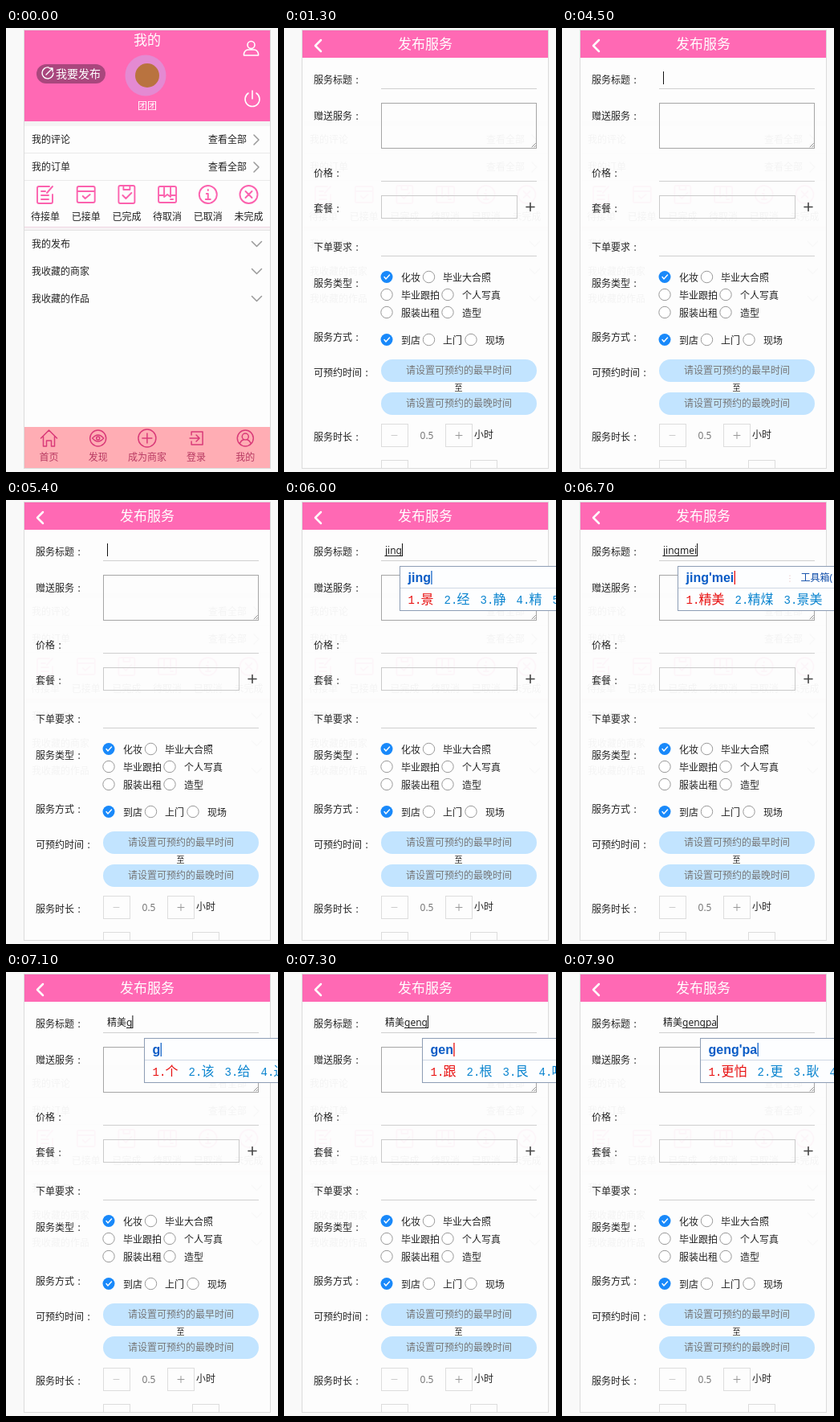
An HTML page that plays this animation: 339x552 px, repeating every 8 s.

```html
<!DOCTYPE html>
<html lang="zh-CN">
<head>
<meta charset="utf-8">
<title>发布服务</title>
<style>
html, body { margin: 0; width: 100%; height: 100%; overflow: hidden; background: #f9f9f9; }
svg { display: block; width: 339px; height: 552px; }
text { font: 12px "Noto Sans", "Noto Sans CJK SC", "Noto Sans CJK", sans-serif; fill: #222; white-space: pre; }
.title { font-size: 17px; fill: #fff; }
.mid { text-anchor: middle; }
.line { fill: none; stroke-linecap: round; stroke-linejoin: round; }
#popup .typed { font: bold 16px "Liberation Sans", Arial, sans-serif; fill: #0a5cc6; }
#popup .num { font: 14px "Liberation Mono", monospace; }
#popup .cand { font-size: 16px; }
</style>
</head>
<body>
<svg viewBox="0 0 339 552" xmlns="http://www.w3.org/2000/svg">
  <defs><clipPath id="screen"><rect x="23" y="3" width="306" height="544"/></clipPath></defs>
  <rect x="22.5" y="2.5" width="307" height="545" fill="#fdfdfd" stroke="#dcdcdc"/>
  <g clip-path="url(#screen)">
    <g id="list"></g>
    <g id="profile"></g>
    <g id="form"></g>
  </g>
  <g id="field">
    <text id="entry" x="126" y="67"></text>
    <path id="under" stroke="#222"/>
    <path id="caret" stroke="#111"/>
  </g>
  <g id="popup"></g>
</svg>
<script>
const $ = id => document.getElementById(id);
const PINK = '#ff69b4', ICON = '#fb62ae', TAB = '#d93a78';

const text = (x, y, s, attrs = '') => `<text x="${x}" y="${y}" ${attrs}>${s}</text>`;
const mid = (x, y, s, style = '') => text(x, y, s, `class="mid" style="${style}"`);
const rect = (x, y, w, h, fill, more = '') =>
  `<rect x="${x}" y="${y}" width="${w}" height="${h}" fill="${fill}" ${more}/>`;
const path = (d, color, width = 1, at = '0 0') =>
  `<path class="line" d="${d}" stroke="${color}" stroke-width="${width}" transform="translate(${at})"/>`;
const ring = (x, y, r) => `M${x - r} ${y}a${r} ${r} 0 1 0 ${2 * r} 0a${r} ${r} 0 1 0 ${-2 * r} 0`;
const box = (x, y, w, h, color) => rect(x + .5, y + .5, w, h, 'none', `stroke="${color}"`);
const rule = (x1, x2, y, color) => `<path d="M${x1} ${y + .5}H${x2}" stroke="${color}"/>`;

// Profile page: rows and order states
const orders = [
  ['待接单', 'M5 -10H-8Q-10 -10 -10 -8V9Q-10 11 -8 11H7Q9 11 9 9V0M9 -10L2 -2M-5 -4H0M-5 1H4M-5 6H4'],
  ['已接单', 'M-9 -10H9Q11 -10 11 -8V8Q11 10 9 10H-9Q-11 10 -11 8V-8Q-11 -10 -9 -10M-11 -4H11M-4 2L-1 5L5 0'],
  ['已完成', 'M-8 -11H8Q10 -11 10 -9V9Q10 11 8 11H-8Q-10 11 -10 9V-9Q-10 -11 -8 -11M-4 -11V-6H4V-11M-5 1L-1 5L6 -2'],
  ['待取消', 'M-9 -10H9Q11 -10 11 -8V8Q11 10 9 10H-9Q-11 10 -11 8V-8Q-11 -10 -9 -10M-11 1H-4M4 1H11M-4 -10V3L0 0L4 3V-10M4 6H7'],
  ['已取消', ring(0, 0, 11) + 'M0 -6V-5M-2 -1H0V6M-3 6H3'],
  ['未完成', ring(0, 0, 11) + 'M-4 -4L4 4M4 -4L-4 4']
];

$('list').innerHTML =
  rect(23, 116, 306, 6, '#f4f4f4') +
  [['我的评论', 139], ['我的订单', 173]].map(([s, y]) =>
    text(32, y + 4, s) + text(252, y + 4, '查看全部') +
    path('M0 -6L6 0L0 6', '#999', 1.5, `309 ${y}`) + rule(23, 329, y + 16, '#eaeaea')).join('') +
  orders.map(([s, d], i) => {
    const x = 49 + i * 50.7;
    return path(d, ICON, 1.9, `${x} 207`) + mid(x, 239, s);
  }).join('') +
  rect(23, 247, 306, 5, '#f6f2f4') + rule(23, 329, 247, '#f0d5e2') + rule(23, 329, 251, '#e4e4e4') +
  ['我的发布', '我收藏的商家', '我收藏的作品'].map((s, i) =>
    text(32, 273 + i * 34, s) + path('M-6 -3L0 3L6 -3', '#999', 1.5, `312.5 ${268.5 + i * 34}`)).join('');

const tabs = [
  ['首页', 'M-10 0L0 -10L10 0M-7 -2V10H-3V3H3V10H7V-2'],
  ['发现', ring(0, 0, 10) + 'M-7 0Q0 -8 7 0Q0 8 -7 0' + ring(0, 0, 2)],
  ['成为商家', ring(0, 0, 11) + 'M-6 0H6M0 -6V6'],
  ['登录', 'M-6 -4V-8H8V8H-6V4M-8 0H3M0 -4L4 0L0 4'],
  ['我的', ring(0, 0, 10) + ring(0, -2, 4) + 'M-7 7Q-5 2 -2 2M7 7Q5 2 2 2']
];

$('profile').innerHTML =
  rect(23, 3, 306, 113, PINK) + text(176, 21, '我的', 'class="title mid"') +
  path(ring(0, -5, 4.5) + 'M-9 8V6Q-8 1 -3 1H3Q8 1 9 6V8Z', '#fff', 1.6, '305.5 26') +
  path('M-5 -7A9 9 0 1 0 5 -7M0 -10V0', '#fff', 1.6, '307 88') +
  rect(38, 45, 86, 24, '#a9477d', 'rx="12"') +
  path('M1 -7A7 7 0 1 0 7 0M-2 2L6 -6M2 -6H6V-2', '#fff', 1.4, '52 56') +
  text(62, 62, '我要发布', 'style="font-size:14px;fill:#fff"') +
  '<circle cx="174" cy="59" r="25.5" fill="#e48ad2"/><circle cx="176" cy="59" r="15" fill="#b9733f"/>' +
  mid(176, 101, '团团', 'fill:#fff') +
  rect(23, 496, 306, 51, '#ffadb4') +
  tabs.map(([s, d], i) => {
    const x = 53.5 + i * 61.2;
    return path(d, TAB, 1.5, `${x} 510`) + mid(x, 538, s, 'fill:#b83a62');
  }).join('');

// Publishing form
const label = (y, s) => text(37, y, s) + mid(43 + 12 * s.length, y, ':');
const radio = (x, y, s, tx, on) => (on
  ? `<circle cx="${x}" cy="${y}" r="7.5" fill="#1989fa"/>` + path('M-3 0L-1 2.5L3.5 -2.5', '#fff', 1.4, `${x} ${y}`)
  : `<circle cx="${x}" cy="${y}" r="7.2" fill="#fff" stroke="#999"/>`) + text(tx, y + 5, s);
const pill = (y, s) => rect(121, y, 194, 28, '#c2e4ff', 'rx="14"') + mid(218, y + 18, s, 'fill:#767676');

$('form').innerHTML =
  rect(23, 3, 306, 34, PINK) + path('M46 15L39 22L46 29', '#fff', 2.5) +
  text(176, 26, '发布服务', 'class="title mid"') +
  [[69, '服务标题'], [114, '赠送服务'], [185, '价格'], [229, '套餐'], [277, '下单要求'],
   [322, '服务类型'], [389, '服务方式'], [433, '可预约时间'], [513, '服务时长']].map(a => label(...a)).join('') +
  [75, 190, 283].map(y => rule(121, 315, y, '#d0d0d0')).join('') +
  box(121, 93, 193, 56, '#a6a6a6') + path('M309 148L313.500 143.500M312 148L313.500 146.500', '#777', .8) +
  box(121, 208, 169, 28, '#cacaca') + path('M302 222.500H312M307 217.500V227.500', '#444', 1.6) +
  radio(128, 309.5, '化妆', 146, true) + radio(180.5, 309.5, '毕业大合照', 198) +
  radio(128, 331.5, '毕业跟拍', 146) + radio(204, 331.5, '个人写真', 222) +
  radio(128, 353.5, '服装出租', 146) + radio(204, 353.5, '造型', 222) +
  radio(128, 387.5, '到店', 146, true) + radio(180.5, 387.5, '上门', 198) + radio(233, 387.5, '现场', 251) +
  pill(412, '请设置可预约的最早时间') + mid(217.5, 451, '至', 'font-size:10px') + pill(453, '请设置可预约的最晚时间') +
  box(121, 492, 33, 28, '#ddd') + path('M134 506.500H141', '#ccc') +
  mid(178, 511, '0.5', 'fill:#777') +
  box(201, 492, 33, 28, '#ddd') + path('M214 506.500H222M218 502.500V510.500', '#999') +
  text(237, 510, '小时') + box(121, 537, 33, 28, '#ddd') + box(232, 537, 33, 28, '#ddd');

// [start, committed, typed, popup text, candidates, popup caret, toolbox]
const BLUE = '#1565c8', RED = '#e81010';
const steps = [
  [4500, '', ''],
  [4900, null],
  [5400, '', ''],
  [5700, '', 'ji', 'ji', '及 级 几 即 机', BLUE],
  [5900, '', 'jin', 'jin', '进 今 金 仅 近', BLUE],
  [6000, '', 'jing', 'jing', '景 经 静 精 竟', BLUE],
  [6100, '', 'jingm', "jing'm", '精美 静默 景 经', BLUE],
  [6200, '', 'jingme', "jing'me", '精么 景么 景 经', BLUE],
  [6400, '', 'jingmei', "jing'mei", '精美 精煤 景美', BLUE],
  [6700, '', 'jingmei', "jing'mei", '精美 精煤 景美', RED, true],
  [6800, '精美', ''],
  [7100, '精美', 'g', 'g', '个 该 给 过', BLUE],
  [7200, '精美', 'ge', 'ge', '个 各 歌 格', BLUE],
  [7300, '精美', 'geng', 'gen', '跟 根 艮 哏', RED],
  [7400, '精美', 'geng', 'geng', '更 耿 梗 耕', BLUE],
  [7600, '精美', 'gengp', "geng'p", '更怕 更 耿 梗', BLUE],
  [7900, '精美', 'gengpa', "geng'pa", '更怕 更 耿 梗', BLUE]
];

function drawPopup(x, typed, words, caret, tools) {
  let cx = x + 9.5;
  const cands = words.split(' ').map((w, i) => {
    const fill = `style="fill:${i ? '#0a84cf' : RED}"`;
    const s = text(cx, 129, `${i + 1}.`, `class="num" ${fill}`) + text(cx + 16, 129, w, `class="cand" ${fill}`);
    cx += 29 + 16 * w.length;
    return s;
  }).join('');
  $('popup').innerHTML = rect(x - .5, 82.5, 300, 55, '#fdfeff', 'stroke="#8d9db5"') +
    rule(x, 339, 109, '#cfd8e4') + text(x + 9.5, 102, typed, 'class="typed"') + cands +
    (tools ? path('M284 94V94.100M284 97.500V97.600M284 101V101.100', '#e4b4b4', 1.2) +
      text(297.5, 101, '工具箱(', 'style="fill:#0b4aa8"') : '');
  const end = x + 10.5 + $('popup').querySelector('.typed').getComputedTextLength();
  $('popup').innerHTML += `<path d="M${end} 88V105" stroke="${caret}" stroke-width="1.3"/>`;
}

function drawStep([, done, typed, popTyped, words, caret, tools]) {
  const entry = $('entry');
  entry.textContent = done + typed;
  const end = 126.5 + entry.getComputedTextLength();
  $('caret').setAttribute('d', `M${end} 54V70`);
  $('under').setAttribute('d', typed ? `M${126 + done.length * 12} 69.500H${end}` : '');
  if (words) drawPopup(done ? 173 : 145, popTyped, words, caret, tools);
  else $('popup').innerHTML = '';
}

const show = (id, on) => { $(id).style.display = on ? '' : 'none'; };
let last = null;

function frame() {
  const t = performance.now() % 8000;
  const step = steps.filter(s => s[0] <= t).pop();
  const key = step ? step[0] : t >= 1300 ? 1300 : 0;
  if (key !== last) {
    last = key;
    const form = key >= 1300, active = !!step && step[1] !== null;
    show('profile', !form);
    show('form', form);
    show('field', active);
    show('popup', active);
    $('list').style.opacity = form ? .04 : 1;
    if (active) drawStep(step);
  }
  requestAnimationFrame(frame);
}
frame();
</script>
</body>
</html>
```
